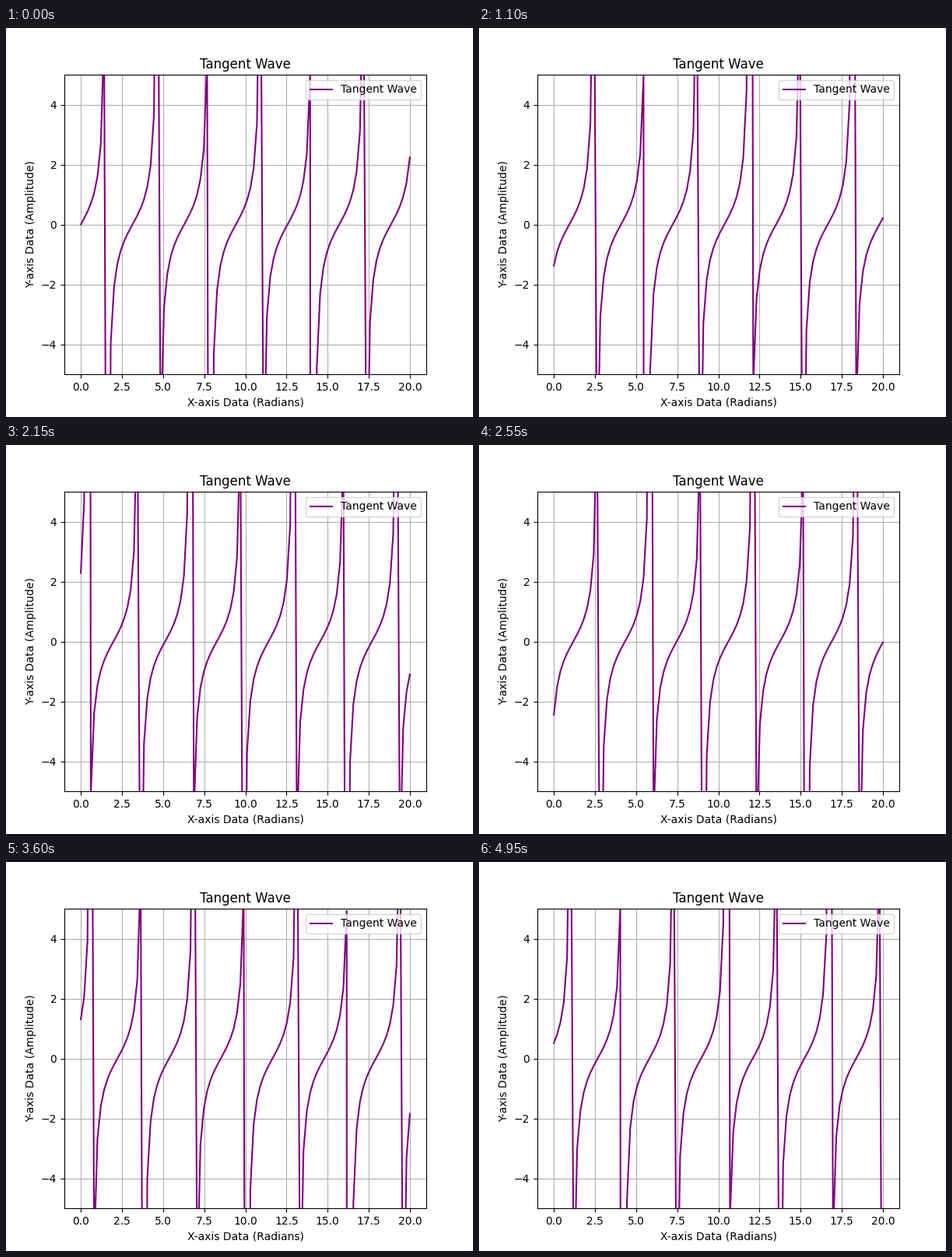
A matplotlib script for the animation above (5 s loop, 600 by 500 pixels).

```python
import numpy as np
import matplotlib.pyplot as plt
from matplotlib.animation import FuncAnimation

FRAMES = 100
INTERVAL = 50      # ms
PHASE_STEP = 0.1   # radians per frame

x = np.linspace(0, 20, 100)

fig, ax = plt.subplots(figsize=(6, 5), dpi=100)
line, = ax.plot(x, np.tan(x), color="purple", label="Tangent Wave")
ax.set_xlim(-1, 21)
ax.set_ylim(-5, 5)
ax.set_title("Tangent Wave")
ax.set_xlabel("X-axis Data (Radians)")
ax.set_ylabel("Y-axis Data (Amplitude)")
ax.grid(True)
# "best" is re-evaluated on every draw, so the legend jumps to the freer corner
ax.legend(loc="best")


def update(frame):
    line.set_ydata(np.tan(x + PHASE_STEP * frame))
    return line,


anim = FuncAnimation(fig, update, frames=FRAMES, interval=INTERVAL,
                     repeat=True, repeat_delay=0, blit=False)

plt.show()
```
